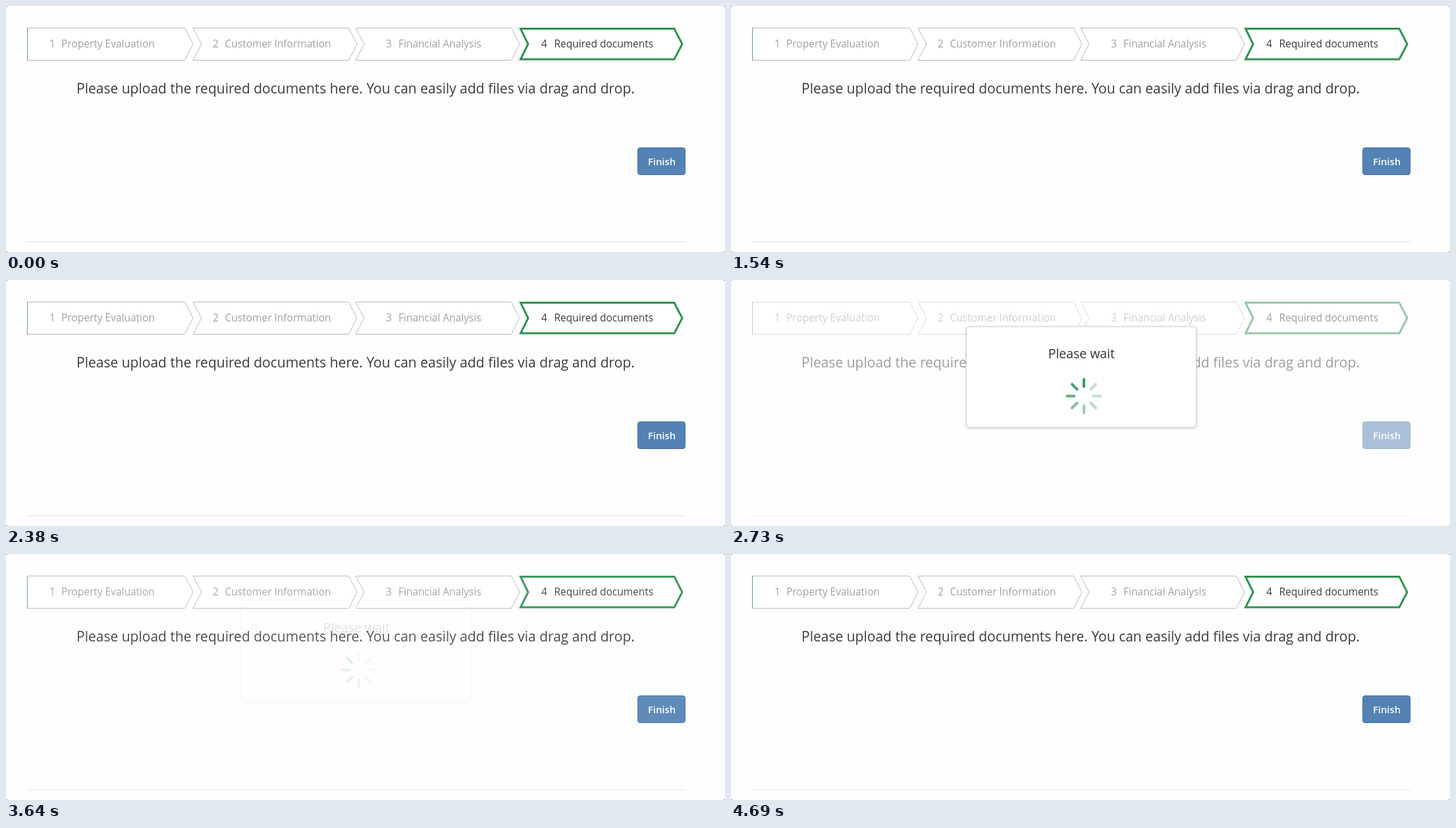
Animation, 1092 px wide and 374 px high, one loop 4.76 s. Source, as an HTML page:

```html
<!DOCTYPE html>
<html lang="en">
<head>
<meta charset="utf-8">
<title>Required documents</title>
<style>
  html, body { margin: 0; width: 100%; height: 100%; overflow: hidden; background: #777; }
  svg { display: block; width: 1092px; height: 374px; }
  text { font-family: "Open Sans", "Noto Sans", sans-serif; fill: #3b3b37; }
  .label { font-size: 15.5px; }
  .muted { fill: #a0a0a0; }
  .step { fill: #fff; stroke: #b9b9b9; }
  .active { stroke: #2f9151; stroke-width: 3; }
</style>
</head>
<body>
<svg viewBox="0 0 1092 374">
  <rect width="1092" height="374" rx="3" fill="#fefefe"/>
  <path d="M32 358.5H1032" stroke="#e2e2e2"/>

  <g id="page">
    <g id="steps"></g>
    <path d="M32.5 33V83" stroke="#5f9f80"/>
    <text x="107" y="133" font-size="21">Please upload the required documents here. You can easily add files via drag and drop.</text>
    <rect x="959.5" y="215.5" width="72" height="41" rx="3.5" fill="#5482b4" stroke="#44709f"/>
    <text x="996" y="241.5" font-size="14.8" font-weight="600" text-anchor="middle" style="fill:#fff">Finish</text>
  </g>

  <g id="wait">
    <rect width="1092" height="374" rx="3" fill="#fff" fill-opacity=".5"/>
    <rect id="dialog" x="357.5" y="71" width="349" height="153" rx="4.5" fill="#fff" stroke="#cfcfcf"
          style="filter:drop-shadow(0 1px 2px rgba(0,0,0,.18))"/>
    <text x="532.3" y="119" font-size="19.4" text-anchor="middle" style="fill:#333">Please wait</text>
    <g id="spinner" transform="translate(536 176.5)" stroke="#349a5e" stroke-width="4" stroke-linecap="round"></g>
  </g>
</svg>
<script>
const LOOP = 4760;
const BLANK = [1610, 2380];
const FADE_IN = [2380, 2580];
const FADE_OUT = [3430, 3710];
const SPIN_PERIOD = 1000;
const BARS = 8;

const $ = id => document.getElementById(id);

function add(parent, tag, attrs, content = "") {
  const node = document.createElementNS("http://www.w3.org/2000/svg", tag);
  for (const key in attrs) node.setAttribute(key, attrs[key]);
  node.textContent = content;
  parent.append(node);
  return node;
}

// Each step: left edge, right shoulder, number position, title position, title
[
  [32.5, 271.5, 66, 84, "Property Evaluation"],
  [284, 520.5, 314, 332.5, "Customer Information"],
  [531, 767.5, 577, 596, "Financial Analysis"],
  [781.5, 1015, 813, 832.5, "Required documents"]
].forEach(([left, right, numberX, titleX, title], i) => {
  const active = i === 3;
  const [top, bottom] = active ? [34.5, 81] : [33.5, 82.5];
  const tip = right + (active ? 12 : 12.5);
  const notch = i === 0 ? left : left + (active ? 11.5 : 13);
  add($("steps"), "path", {
    class: active ? "step active" : "step",
    d: `M${left} ${top}H${right}L${tip} 58L${right} ${bottom}H${left}L${notch} 58Z`
  });
  const style = active ? "label" : "label muted";
  add($("steps"), "text", { class: style, x: numberX, y: 63 }, i + 1);
  add($("steps"), "text", { class: style, x: titleX, y: 63 }, title);
});

const bars = Array.from({ length: BARS }, (_, i) =>
  add($("spinner"), "path", { d: "M0 -14.5V-25.5", transform: `rotate(${i * 360 / BARS})` }));

const swing = (t, [from, to]) => {
  const p = Math.min(1, Math.max(0, (t - from) / (to - from)));
  return (1 - Math.cos(Math.PI * p)) / 2;
};

function render(t) {
  const blank = t >= BLANK[0] && t < BLANK[1];
  $("page").style.display = blank ? "none" : "";

  const shown = swing(t, FADE_IN) - swing(t, FADE_OUT);
  $("wait").style.display = shown > 0 ? "" : "none";
  $("wait").style.opacity = shown;

  // The head points straight down at 3150 ms and runs clockwise.
  const head = 0.5 + (t - 3150) / SPIN_PERIOD;
  bars.forEach((bar, i) => {
    const turn = head - i / BARS + 1e-6;
    const age = Math.min(1, (turn - Math.floor(turn)) * BARS / (BARS - 1));
    bar.style.opacity = 0.3 + 0.35 * (1 + Math.cos(Math.PI * age));
  });
}

const start = performance.now();
function tick() {
  render((performance.now() - start) % LOOP);
  requestAnimationFrame(tick);
}
tick();
</script>
</body>
</html>
```
